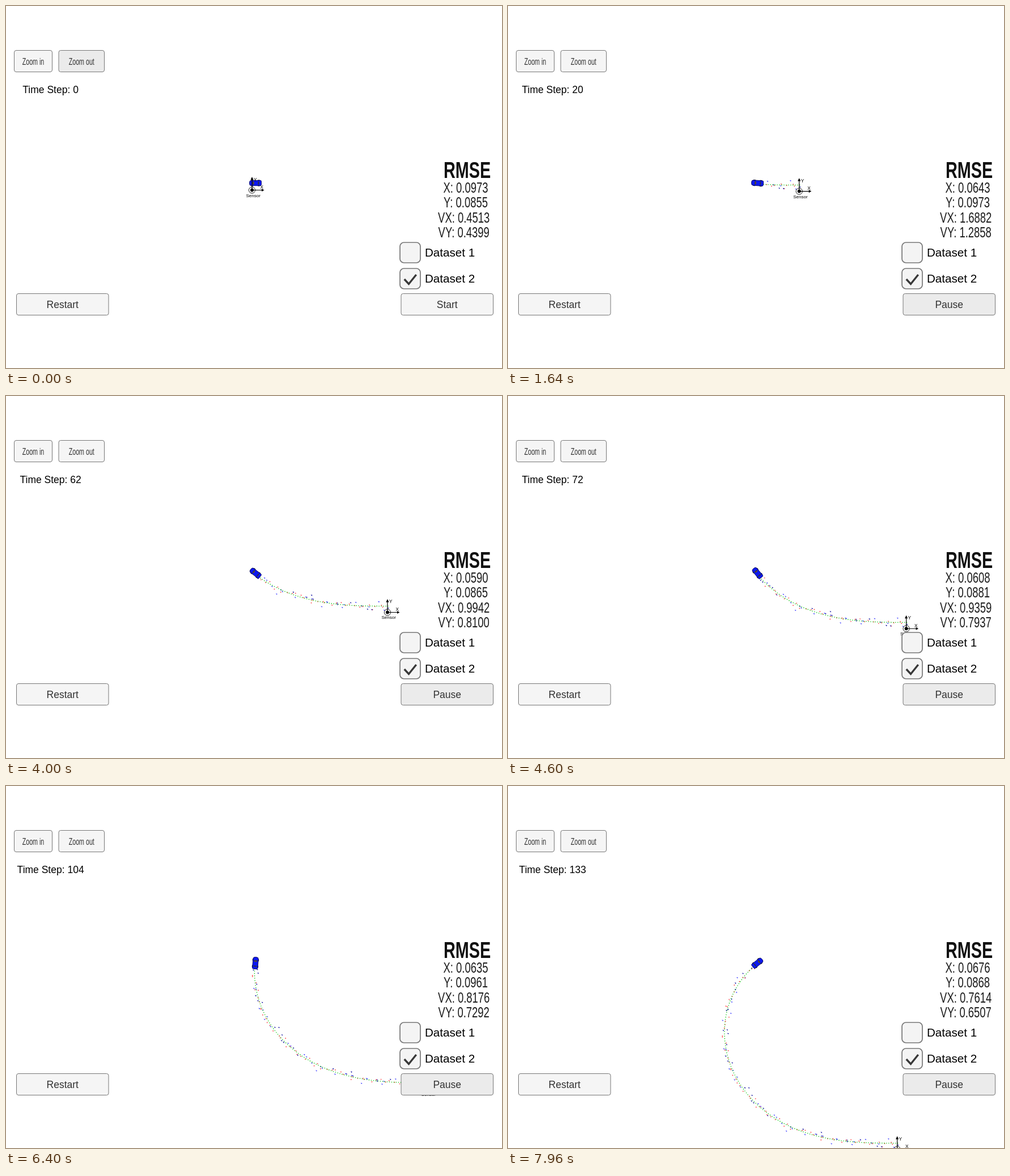
An HTML page with a canvas that plays this animation: 875x640 px, repeating every 8 s.

```html
<!DOCTYPE html>
<html lang="en">
<head>
<meta charset="utf-8">
<title>Tracking simulator</title>
<style>
html, body { margin: 0; width: 100%; height: 100%; overflow: hidden; background: #fff; }
canvas { display: block; }
</style>
</head>
<body>
<canvas id="stage" width="875" height="640"></canvas>
<script>
const ctx = document.getElementById('stage').getContext('2d');
const FONT = '"Liberation Sans", Arial, sans-serif';
const LOOP = 8000;
const PRESS = 500;
const CAR = { x: 440, y: 313 };
const UPDATES = [0, 1060, 1640, 2200, 2760, 3340, 4000, 4600, 5260, 5820, 6400, 7400, 7960];

// Key readings: time in ms, time step, then the errors X, Y, VX, VY
const READINGS = [
  [PRESS, 0, 0.0973, 0.0855, 0.4513, 0.4399],
  [1640, 20, 0.0643, 0.0973, 1.6882, 1.2858],
  [2760, 41, 0.0539, 0.0822, 1.1994, 0.9407],
  [4000, 62, 0.0590, 0.0865, 0.9942, 0.8100],
  [5260, 84, 0.0627, 0.0898, 0.8718, 0.7757],
  [6400, 104, 0.0635, 0.0961, 0.8176, 0.7292],
  [7960, 133, 0.0676, 0.0868, 0.7614, 0.6507]
];

function readingAt(t) {
  const next = READINGS.findIndex(row => row[0] >= t);
  if (next < 1) return READINGS[0].slice(1);
  const a = READINGS[next - 1], b = READINGS[next];
  const u = (t - a[0]) / (b[0] - a[0]);
  return a.map((v, i) => v + (b[i] - v) * u).slice(1);
}

// The car turns steadily to the right while speeding up a little.
const heading = s => s * s * (0.0117 - 0.000028 * s) * Math.PI / 180;
const speed = s => 3.96 + 0.0027 * s;

const track = [{ x: 434, y: 325.5 }];
for (let s = 0; s < 133; s++) {
  const { x, y } = track[s], mid = s + 0.5;
  track.push({ x: x + speed(mid) * Math.cos(heading(mid)), y: y + speed(mid) * Math.sin(heading(mid)) });
}

function random(n) {
  const v = Math.sin(n * 12.9898) * 43758.5453;
  return v - Math.floor(v);
}

const noise = n => 2 * (random(n) + random(n + 0.37) + random(n + 0.71)) - 3;

function text(str, x, y, size, { color = '#000', align = 'center', weight = '', squeeze = 1 } = {}) {
  ctx.save();
  ctx.translate(x, y);
  ctx.scale(squeeze, 1);
  ctx.font = `${weight} ${size}px ${FONT}`;
  ctx.textAlign = align;
  ctx.fillStyle = color;
  ctx.fillText(str, 0, 0);
  ctx.restore();
}

function box(x, y, w, h, r, fill, stroke, line) {
  ctx.beginPath();
  ctx.roundRect(x, y, w, h, r);
  ctx.fillStyle = fill;
  ctx.fill();
  if (stroke) {
    ctx.strokeStyle = stroke;
    ctx.lineWidth = line;
    ctx.stroke();
  }
}

function polygon(color, ...pts) {
  ctx.beginPath();
  pts.forEach(([x, y]) => ctx.lineTo(x, y));
  ctx.fillStyle = color;
  ctx.fill();
}

function dot(x, y, r, color) {
  ctx.beginPath();
  ctx.arc(x, y, r, 0, Math.PI * 2);
  ctx.fillStyle = color;
  ctx.fill();
}

// Estimates in green; radar (blue) and laser (red) readings take turns.
function drawTrail(step) {
  const now = track[step];
  for (let s = 1; s <= step; s++) {
    const x = CAR.x + now.x - track[s].x - 1;
    const y = CAR.y + now.y - track[s].y + 1.5;
    const spread = s % 2 ? 5.5 : 2.6;
    const mx = x + noise(s) * spread, my = y + noise(s + 500) * spread;
    if (s % 2) {
      const color = random(s + 90) < 0.6 ? '#000098' : '#3030ff';
      polygon(color, [mx - 1.4, my - 1], [mx + 1.4, my - 0.5], [mx + 0.4, my + 1.3]);
    } else {
      dot(mx, my, 0.95, '#ff5050');
    }
    dot(x, y, 0.8, '#10c810');
  }
}

function drawCar(step) {
  ctx.save();
  ctx.translate(CAR.x, CAR.y);
  ctx.rotate(heading(step));
  for (const x of [-7.5, 4]) box(x, -5.6, 4, 11.2, 1, '#000');
  box(-10.5, -4.7, 21, 9.4, [3.5, 2, 2, 3.5], '#0c18f0', '#000050', 0.8);
  polygon('#2e2e48', [-5, -3.3], [-2.5, -2.6], [-2.5, 2.6], [-5, 3.3]);
  polygon('#2e2e48', [4.5, -2.6], [6.5, -3.2], [6.5, 3.2], [4.5, 2.6]);
  box(-3.7, -2, 1.2, 4, 0, '#7a5a20');
  ctx.restore();
}

function drawSensor(step) {
  ctx.save();
  ctx.translate(track[step].x, track[step].y);
  ctx.strokeStyle = '#000';
  ctx.lineWidth = 1.2;
  ctx.beginPath();
  ctx.moveTo(0, -19);
  ctx.lineTo(0, 0);
  ctx.lineTo(18, 0);
  ctx.stroke();
  polygon('#000', [0, -23.4], [-2.6, -18], [2.6, -18]);
  polygon('#000', [21.5, 0], [17, -2.6], [17, 2.6]);
  ctx.lineWidth = 0.9;
  ctx.beginPath();
  ctx.arc(0, 0, 5.6, 0, Math.PI * 2);
  ctx.stroke();
  dot(0, 0, 3, '#000');
  text('Y', 5.7, -16, 8.2);
  text('X', 17.2, -2.6, 8.2);
  text('Sensor', 2.2, 12, 8);
  ctx.restore();
}

function button(label, x, y, w, fill, size, squeeze) {
  box(x, y, w, 38, 3.5, fill, '#777', 1);
  text(label, x + w / 2, y + 25.2, size, { color: '#323232', squeeze });
}

function checkbox(label, y, checked) {
  box(695, y, 36, 36, 7, '#f4f4f4', '#777', 1.7);
  if (checked) {
    ctx.beginPath();
    ctx.moveTo(702.7, y + 19);
    ctx.lineTo(710.5, y + 27.5);
    ctx.lineTo(723.7, y + 11);
    ctx.strokeStyle = '#383838';
    ctx.lineWidth = 3.4;
    ctx.stroke();
  }
  text(label, 739, y + 25, 20.6, { align: 'left' });
}

function drawErrors(errors) {
  const squeeze = 0.72;
  text('RMSE', 813.5, 303.8, 40, { weight: 'bold', color: '#111', squeeze });
  ['X', 'Y', 'VX', 'VY'].forEach((name, i) => {
    const x = i < 2 ? 811 : 807.7;
    text(`${name}: ${errors[i].toFixed(4)}`, x, 330 + 26.4 * i, 25.6, { color: '#1c1c1c', squeeze });
  });
}

function draw(t) {
  const [value, ...errors] = readingAt(UPDATES.findLast(at => at <= t));
  const step = Math.floor(value + 1e-6);
  const normal = '#f5f5f5', hover = '#ebebeb', pressed = '#c8c8c8';
  const startFill = t < PRESS ? normal : step ? hover : pressed;
  ctx.fillStyle = '#fff';
  ctx.fillRect(0, 0, 875, 640);

  drawTrail(step);
  drawCar(step);
  drawSensor(step);

  button('Zoom in', 14.5, 78.5, 67, normal, 16.2, 0.66);
  button('Zoom out', 93, 78.5, 80.5, t < PRESS ? hover : normal, 16.2, 0.66);
  text(`Time Step: ${step}`, 78.6, 154.3, 17.5);
  drawErrors(errors);
  checkbox('Dataset 1', 418, false);
  checkbox('Dataset 2', 464, true);
  button('Restart', 18.5, 508.5, 162.5, normal, 17.5);
  button(step ? 'Pause' : 'Start', 697, 508.5, 162.5, startFill, 17.5);
}

function tick() {
  draw(performance.now() % LOOP);
  requestAnimationFrame(tick);
}
tick();
</script>
</body>
</html>
```
